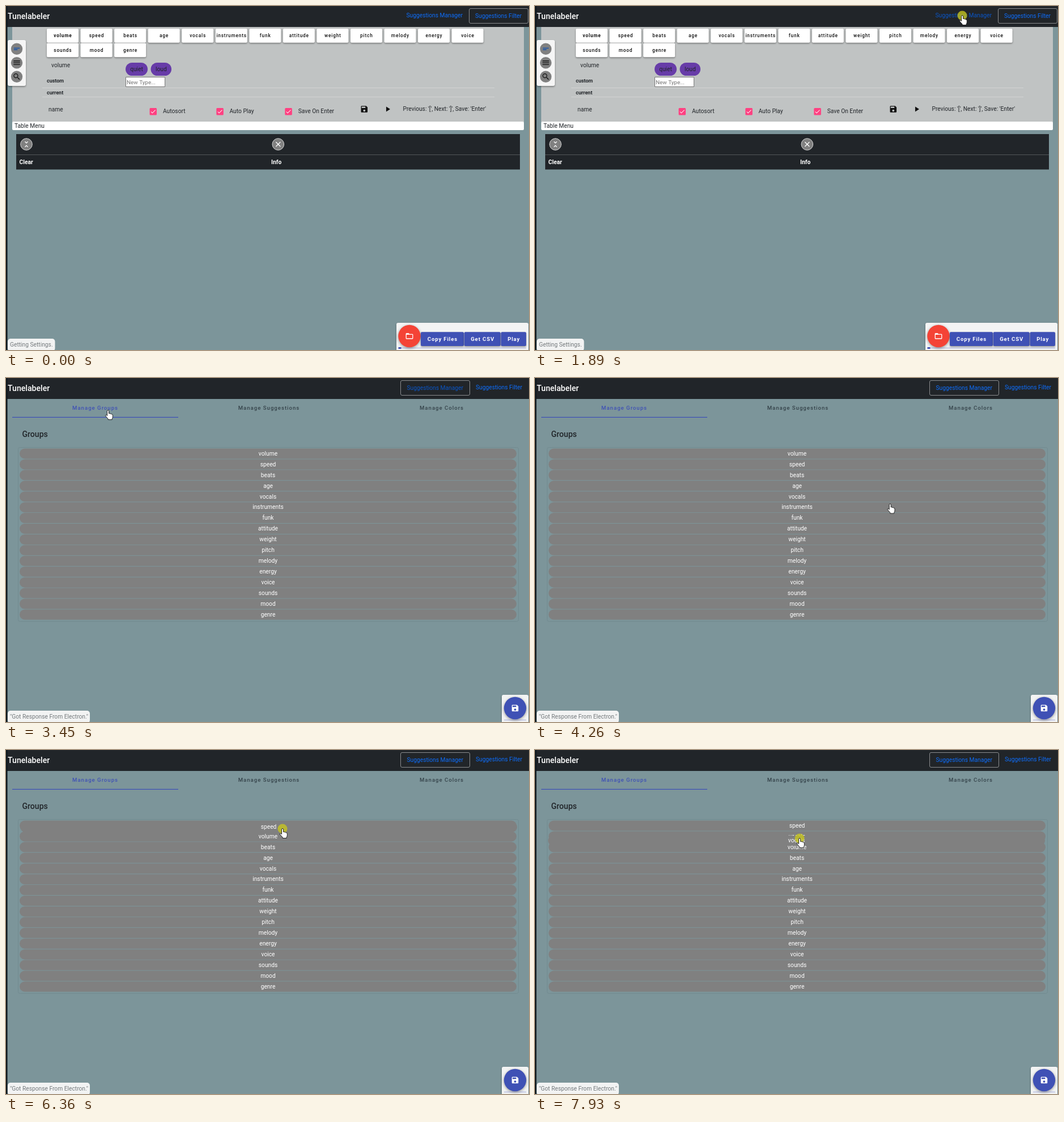
These frames come from a looping animation (923 px wide and 607 px high, 8000 ms). An HTML page with a canvas:

```html
<!DOCTYPE html>
<html lang="en">
<head>
<meta charset="utf-8">
<title>Tunelabeler</title>
<style>
html, body { margin: 0; width: 100%; height: 100%; overflow: hidden; background: #7c959a; }
canvas { display: block; }
</style>
</head>
<body>
<canvas id="stage" width="923" height="607"></canvas>
<script>
const ctx = document.getElementById('stage').getContext('2d');
const LOOP = 8000, PAGE_SWITCH = 2020;
const DARK = '#212529', INDIGO = '#3f51b5', LINK = '#0d6efd', LINK_HOVER = '#0a56c8', GREY = '#808080';
const BODY = 10.24;
const ROW_TOP = 124, ROW_PITCH = 18.93;

const groups = ['volume', 'speed', 'beats', 'age', 'vocals', 'instruments', 'funk', 'attitude',
  'weight', 'pitch', 'melody', 'energy', 'voice', 'sounds', 'mood', 'genre'];

// time, x, y of the pointer tip
const pointerPath = [
  [70, 905, 600], [530, 271, 167], [860, 271, 167], [1070, 761, 46], [1210, 761, 46],
  [1600, 754, 17], [2550, 754, 17], [2890, 150, 64], [3110, 150, 64], [3450, 180, 57],
  [3590, 480, 61], [3920, 480, 61], [4130, 770, 60], [4400, 470, 400], [4660, 454, 131],
  [4730, 454, 131], [5010, 464, 133], [5060, 480, 132], [5260, 480, 132], [6000, 487, 149],
  [6080, 487, 155], [6360, 488, 139], [6500, 488, 137], [6760, 488, 137], [7040, 468, 201],
  [7510, 468, 201], [7580, 468, 206], [7930, 467, 156], [8000, 467, 155]
];

const drags = [
  { item: 'speed', from: 6080, to: 6760, grabX: 487, offset: -3 },
  { item: 'vocals', from: 7580, to: 8000, grabX: 468, offset: 4 }
];

const icons = {
  save: 'M17 3H5c-1.1 0-2 .9-2 2v14c0 1.1.9 2 2 2h14c1.1 0 2-.9 2-2V7l-4-4zm-5 16c-1.66 0-3-1.34-3-3s1.34-3 3-3 3 1.34 3 3-1.34 3-3 3zm3-10H5V5h10v4z',
  play: 'M8 5v14l11-7z',
  folder: 'M20 6h-8l-2-2H4c-1.1 0-2 .9-2 2v12c0 1.1.9 2 2 2h16c1.1 0 2-.9 2-2V8c0-1.1-.9-2-2-2zm0 12H4V8h16v10z',
  collapse: 'M7.4 18.6L8.8 20 12 16.8 15.2 20l1.4-1.4L12 14zM16.6 5.4L15.2 4 12 7.2 8.8 4 7.4 5.4 12 10z',
  close: 'M19 6.4L17.6 5 12 10.6 6.4 5 5 6.4 10.6 12 5 17.6 6.4 19 12 13.4 17.6 19 19 17.6 13.4 12z',
  short: 'M4 9h16v2H4zM4 13h10v2H4z',
  menu: 'M3 18h18v-2H3zM3 13h18v-2H3zM3 8h18V6H3z',
  search: 'M15.5 14h-.8l-.3-.3A6.5 6.5 0 1 0 13.7 14.4l.3.3v.8l5 5 1.5-1.5zm-6 0a4.5 4.5 0 1 1 0-9 4.5 4.5 0 0 1 0 9z',
  check: 'M9 16.2L4.8 12l-1.4 1.4L9 19 21 7l-1.4-1.4z',
  hand: 'M-1.5 9.5V1.2a1.5 1.5 0 0 1 3 0V5.5q2-.6 2.6.7q1.9-.5 2.4.8q1.8-.1 1.8 1.5v3q0 2-1.2 3.4v1.6h-7v-1.5L-4.4 10q-.6-1.8 .9-1.9q1 .2 2 1.6z',
  arrow: 'M0 0V13L3 10.2 5 15 7.2 14 5.2 9.4H9.2z'
};
for (const name in icons) icons[name] = new Path2D(icons[name]);

function text(str, x, y, { size = BODY, weight = 400, color = DARK, align = 'left', spacing = 0 } = {}) {
  ctx.font = `${weight} ${size}px Roboto, sans-serif`;
  ctx.letterSpacing = spacing + 'px';
  ctx.textAlign = align;
  ctx.fillStyle = color;
  ctx.fillText(str, x + (align === 'center' ? spacing / 2 : 0), y + size * 0.355);
}

function box(x, y, w, h, fill, radius = 0, stroke) {
  ctx.beginPath();
  ctx.roundRect(x, y, w, h, radius);
  if (fill) { ctx.fillStyle = fill; ctx.fill(); }
  if (stroke) { ctx.strokeStyle = stroke; ctx.lineWidth = 1; ctx.stroke(); }
}

function circle(x, y, r, fill, stroke) {
  box(x - r, y - r, 2 * r, 2 * r, fill, r, stroke);
}

function icon(name, x, y, color, size = 15.4) {
  ctx.save();
  ctx.translate(x - size / 2, y - size / 2);
  ctx.scale(size / 24, size / 24);
  ctx.fillStyle = color;
  ctx.fill(icons[name], 'evenodd');
  ctx.restore();
}

function raised(draw, blur = 3) {
  ctx.save();
  ctx.shadowColor = 'rgba(0,0,0,.4)';
  ctx.shadowBlur = blur;
  ctx.shadowOffsetY = 1.5;
  draw();
  ctx.restore();
}

function pointerAt(t) {
  if (t < pointerPath[0][0]) return null;
  const i = pointerPath.findIndex(key => key[0] > t);
  const [t0, x0, y0] = pointerPath[i - 1], [t1, x1, y1] = pointerPath[i];
  const u = (t - t0) / (t1 - t0), k = u * u * (3 - 2 * u);
  return { x: x0 + (x1 - x0) * k, y: y0 + (y1 - y0) * k };
}

function drawHeader(t) {
  ctx.fillStyle = '#7c959a';
  ctx.fillRect(0, 0, 923, 607);
  ctx.fillStyle = DARK;
  ctx.fillRect(0, 0, 923, 37);
  ctx.fillStyle = '#0d171c';
  ctx.fillRect(0, 0, 2.5, 607);
  text('Tunelabeler', 3, 17.5, { size: 14.1, weight: 500, color: '#fff' });

  const managing = t >= PAGE_SWITCH;
  const hovered = t > 1500 && t < 3920;
  text('Suggestions Manager', managing ? 707.5 : 706.5, managing ? 17 : 16.3, { color: hovered ? LINK_HOVER : LINK });
  text('Suggestions Filter', managing ? 829 : 828, managing ? 16.3 : 17, { color: LINK });
  if (managing) box(696.5, 4.5, 122, 26, null, 2.5, t < 2150 ? LINK : '#8b8d8f');
  else box(817.5, 4.5, 104, 26, null, 2.5, '#8b8d8f');
}

function drawStatus(message, width) {
  box(3, 587, width, 22, '#f2f3f3', 5);
  text(message, 7, 597.5, { color: '#74797c' });
}

function drawPanel(x) {
  raised(() => box(x, 559, 922 - x, 52, '#f3f4f4', 3));
  box(x + 4, 602, 914 - x, 3, '#d3d7ea');
}

function drawFilterPage() {
  box(11, 37, 903, 168, '#c0c3c3');
  groups.forEach((name, i) => {
    const x = 72 + 59.55 * (i % 13), y = i < 13 ? 40 : 65.5;
    raised(() => box(x, y, 56, 24.8, '#fff', 2));
    text(name, x + 28, y + 12.4, { size: 8.32, weight: i ? 500 : 700, spacing: 0.8, align: 'center', color: '#111' });
  });

  text('volume', 80, 104);
  box(211, 100, 39, 23, '#673ca8', 11.5);
  box(255.5, 100, 36.5, 23, '#673ca8', 11.5);
  text('quiet', 230.5, 111, { align: 'center' });
  text('loud', 273.8, 111, { align: 'center' });
  text('custom', 72, 132, { size: 9, weight: 700 });
  box(211.5, 125.5, 69, 17, '#fff', 0, '#777');
  text('New Type...', 213, 134, { size: 9.9, color: '#757575' });
  text('current', 72, 153, { size: 9, weight: 700 });
  for (const y of [144, 160]) box(64, y, 798, 1, '#d2d4d4');

  text('name', 75, 182);
  [['Autosort', 253.5, 277], ['Auto Play', 371.3, 394.5], ['Save On Enter', 492.3, 515.7]].forEach(([label, x, labelX]) => {
    box(x, 180, 12.5, 12.5, '#ff4081', 1.5);
    icon('check', x + 6.2, 186.2, '#fff', 11.5);
    text(label, labelX, 185.7);
  });
  icon('save', 632.3, 182, '#111');
  icon('play', 673.5, 182, '#111');
  text("Previous: '[', Next: ']', Save: 'Enter'", 700.5, 181.5);

  box(11, 204, 903, 15, '#fff', 2);
  text('Table Menu', 15, 211);
  box(18, 226, 889, 62.5, DARK);
  box(18, 262, 889, 1, '#53575a');
  [['collapse', 36, 'Clear', 23.5], ['close', 480.3, 'Info', 468]].forEach(([name, x, label, labelX]) => {
    circle(x, 244, 10.3, GREY, '#d5d5d5');
    icon(name, x, 244, '#fff');
    text(label, labelX, 275, { weight: 700, color: '#fff' });
  });

  raised(() => box(3, 60, 32, 81, '#f5f5f5', 3));
  ['short', 'menu', 'search'].forEach((name, i) => {
    const y = 75.7 + 24.5 * i;
    circle(19, y, 10.2, GREY);
    icon(name, 19, y, i ? '#111' : '#0d4fb0');
  });

  drawPanel(689);
  box(692.5, 602, 5, 3, INDIGO);
  raised(() => circle(712, 582.5, 19.7, '#f44336'), 5);
  icon('folder', 712, 582.5, '#fff');
  [['Copy Files', 732, 76], ['Get CSV', 808.7, 64], ['Play', 873.5, 44.5]].forEach(([label, x, w]) => {
    raised(() => box(x, 575.3, w, 24.7, INDIGO, 2));
    text(label, x + w / 2, 587.7, { size: 9.6, weight: 700, spacing: 0.86, align: 'center', color: '#fff' });
  });
  drawStatus('Getting Settings.', 83.5);
}

function drawRow(name, centerY, dx = 0) {
  box(24 + dx, centerY - 9, 877, 18, GREY, 9);
  text(name, 462.5 + dx, centerY - 0.3, { align: 'center', color: '#fff' });
}

function moveItem(list, item, index) {
  const rest = list.filter(name => name !== item);
  rest.splice(index, 0, item);
  return rest;
}

function drawManagerPage(t, pointer) {
  const tab = { size: 9.6, weight: 500, spacing: 1, align: 'center' };
  text('Manage Groups', 157, 53, { ...tab, color: INDIGO });
  text('Manage Suggestions', 463.5, 53, { ...tab, color: '#35434a' });
  text('Manage Colors', 768.5, 53, { ...tab, color: '#35434a' });
  box(11, 68.7, 293, 1.4, INDIGO);
  text('Groups', 28.5, 99, { size: 14.1, weight: 500 });
  box(21.5, 122.5, 883, 307, null, 3, '#728b90');

  const drag = drags.find(d => t >= d.from && t < d.to);
  let order = t >= drags[0].to ? moveItem(groups, drags[0].item, 0) : groups;
  if (drag) order = moveItem(order, drag.item, Math.max(0, Math.floor((pointer.y - ROW_TOP) / ROW_PITCH)));
  order.forEach((name, i) => drawRow(name, 133.5 + ROW_PITCH * i));
  if (drag) drawRow(drag.item, pointer.y + drag.offset, pointer.x - drag.grabX);

  drawPanel(875);
  raised(() => circle(898.5, 582.5, 19.7, INDIGO), 5);
  icon('save', 898.5, 582.5, '#fff');
  drawStatus('"Got Response From Electron."', 145);
}

function drawPointer(t, { x, y }) {
  const clicking = t >= 1750 && t < PAGE_SWITCH;
  if (clicking || drags.some(d => t >= d.from && t < d.to)) circle(x, y, 8.5, 'rgba(200,198,30,.78)');

  const overLink = x > 696 && y < 31;
  const overTab = t >= PAGE_SWITCH && y > 37 && y < 70;
  const overRow = t >= PAGE_SWITCH && y > ROW_TOP && y < 427;
  ctx.save();
  ctx.translate(x, y);
  ctx.fillStyle = '#fff';
  ctx.strokeStyle = '#111';
  ctx.lineWidth = 0.9;
  const shape = icons[overLink || overTab || overRow ? 'hand' : 'arrow'];
  ctx.fill(shape);
  ctx.stroke(shape);
  ctx.restore();
}

function frame() {
  const t = performance.now() % LOOP;
  const pointer = pointerAt(t);
  drawHeader(t);
  if (t < PAGE_SWITCH) drawFilterPage();
  else drawManagerPage(t, pointer);
  if (pointer) drawPointer(t, pointer);
  requestAnimationFrame(frame);
}
requestAnimationFrame(frame);
</script>
</body>
</html>
```
